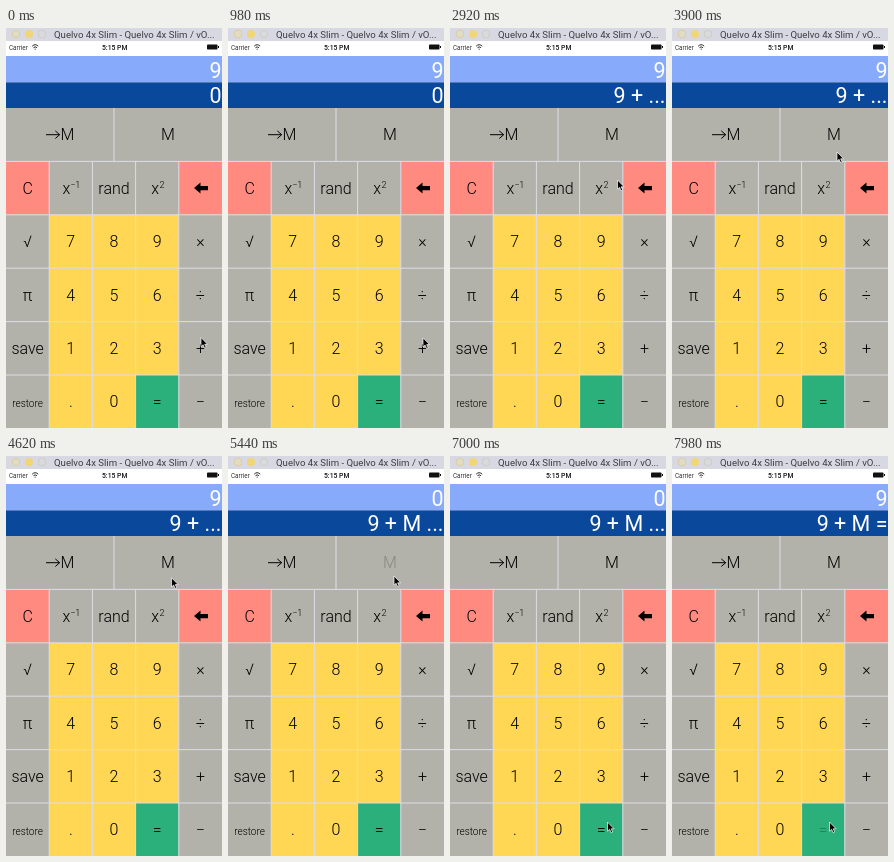
Recreate the animation shown at these times as an HTML page. Size 216 px wide and 400 px high, loop 8000 ms.

```html
<!DOCTYPE html>
<html lang="en">
<head>
<meta charset="utf-8">
<title>Calculator</title>
<style>
  html, body { margin: 0; width: 100%; height: 100%; overflow: hidden; background: #b2b2aa; }
  svg { display: block; width: 100vw; height: 100vh; }
  text { font-family: Roboto, Inter, sans-serif; white-space: pre; }
  .key { font-weight: 300; fill: #000; text-anchor: middle; }
  .lcd { font-size: 21.5px; fill: #fff; text-anchor: end; }
</style>
</head>
<body>
<svg id="stage" viewBox="0 0 216 400"></svg>
<script>
const LOOP = 8000;
const stage = document.getElementById('stage');

function add(tag, attrs, text) {
  const el = document.createElementNS('http://www.w3.org/2000/svg', tag);
  for (const k in attrs) el.setAttribute(k, attrs[k]);
  if (text !== undefined) el.textContent = text;
  stage.appendChild(el);
  return el;
}
const rect = (x, y, width, height, fill) => add('rect', { x, y, width, height, fill });

// Window title bar
rect(0, 0, 216, 13, '#d8d8e2');
add('circle', { cx: 10, cy: 6, r: 3.8, fill: '#e2dcc4', stroke: '#d8c88c', 'stroke-width': .7 });
add('circle', { cx: 23, cy: 6, r: 4, fill: '#f0d674' });
add('circle', { cx: 36, cy: 6, r: 3.8, fill: '#dad9dc', stroke: '#c8c8bc', 'stroke-width': .7 });
add('text', { x: 48, y: 9.6, 'font-size': 9.6, fill: '#3c3c40' },
  'Quelvo 4x Slim - Quelvo 4x Slim / vO...');

// Phone status bar
rect(0, 13, 216, 15, '#fff');
add('text', { x: 3, y: 21.5, 'font-size': 6.3, fill: '#333' }, 'Carrier');
add('path', {
  d: 'M26.2 18.2Q29.2 15.2 32.2 18.2M27.5 19.7Q29.2 18 30.9 19.7M28.7 21.2h1',
  fill: 'none', stroke: '#222', 'stroke-width': 1
});
add('text', { x: 108.7, y: 21.7, 'font-size': 6.8, 'font-weight': 500, fill: '#111', 'text-anchor': 'middle' }, '5:15 PM');
rect(201, 16.5, 10.5, 5, '#111').setAttribute('rx', .8);
rect(212, 18, 1, 2, '#111');

// Displays
rect(0, 28, 216, 26.5, '#87aafb');
rect(0, 54.5, 216, 25.5, '#0a489b');
const value = add('text', { x: 215.5, y: 49.5, class: 'lcd' });
const formula = add('text', { x: 215.5, y: 75, class: 'lcd' });

// Keypad
const GRAY = '#b2b2aa', YELLOW = '#ffd755', RED = '#ff8b80', GREEN = '#2bb07b', LINE = '#dddde6';
const COL = 43.2, ROW = 53.4, TOP = 80;
const rows = [
  ['→M', 'M'],
  ['C', 'x-1', 'rand', 'x2', '⬅'],
  ['√', '7', '8', '9', '×'],
  ['π', '4', '5', '6', '÷'],
  ['save', '1', '2', '3', '+'],
  ['restore', '.', '0', '=', '−']
];
const keys = {};

function keyColor(label) {
  if (label === 'C' || label === '⬅') return RED;
  if (label === '=') return GREEN;
  return /^[\d.]$/.test(label) ? YELLOW : GRAY;
}

function drawLabel(label, cx, cy) {
  const base = cy + 5.7;
  const txt = (s, x, y, size) => add('text', { x, y, class: 'key', 'font-size': size }, s);
  if (label === '→M') {
    add('path', { d: `M40 ${cy}H53.5m-4.2 -3.8L53.7 ${cy}l-4.4 3.8`, fill: 'none', stroke: '#000', 'stroke-width': 1 });
    return txt('M', 61.5, base, 16);
  }
  if (label === '⬅') {
    return add('path', { d: `M188 ${cy}l6.5 -5.5v3.3h7.5v4.4h-7.5v3.3z`, fill: '#000' });
  }
  if (label[0] === 'x') {
    const sup = label.slice(1).replace('-', '−');
    txt('x', sup.length > 1 ? cx - 4.5 : cx - 2, base, 16);
    return txt(sup, sup.length > 1 ? cx + 4.5 : cx + 4.8, base - 6, 9);
  }
  return txt(label, cx, base, label === 'restore' ? 10 : 16);
}

rows.forEach((row, r) => {
  const w = 216 / row.length, y = TOP + r * ROW;
  row.forEach((label, c) => rect(c * w, y, w, ROW, keyColor(label)));
});
rows.forEach((row, r) => {
  const w = 216 / row.length, y = TOP + r * ROW;
  if (r) rect(0, y - .5, 216, 1, LINE);
  row.forEach((label, c) => {
    if (c) rect(c * w - .5, y, 1, ROW, LINE);
    keys[label] = drawLabel(label, (c + .5) * w, y + ROW / 2);
  });
});

const cursor = add('path', {
  d: 'M0 0V9.2L2.1 7.3L3.6 10.7L5.2 10L3.7 6.8H6.6Z',
  fill: '#000', stroke: '#fff', 'stroke-width': .7, 'stroke-linejoin': 'round'
});

// Presses: key, touch down, touch up
const presses = [['+', 1760, 1900], ['M', 5260, 5390], ['=', 7760, 7880]];
const FADE = 420, DIM = .22;

// Readouts from a given time on
const readouts = [[0, '9', '0'], [1900, '9', '9 + ...'], [5390, '0', '9 + M ...'], [7880, '9', '9 + M =']];

// Pointer: time, x, y
const track = [
  [0, 195, 309.5], [900, 195, 309.5], [1400, 195, 314], [2320, 195, 314],
  [2920, 167.5, 152], [3350, 165, 124], [4300, 165, 124], [4900, 166, 120],
  [5850, 166, 120], [6700, 157.5, 366], [LOOP, 157.5, 366]
];

function pointerAt(t) {
  const i = track.findIndex(p => p[0] > t);
  const a = track[i - 1], b = track[i];
  const u = (t - a[0]) / (b[0] - a[0]), e = u * u * (3 - 2 * u);
  return [a[1] + (b[1] - a[1]) * e, a[2] + (b[2] - a[2]) * e];
}

function render(t) {
  const [, top, bottom] = readouts.filter(s => s[0] <= t).pop();
  value.textContent = top;
  formula.textContent = bottom;
  for (const [name, down, up] of presses) {
    const back = Math.min(1, Math.max(0, (t - up) / FADE));
    keys[name].setAttribute('opacity', t < down ? 1 : DIM + (1 - DIM) * back * back);
  }
  cursor.setAttribute('transform', `translate(${pointerAt(t)})`);
}

const start = performance.now();
function tick() {
  render((performance.now() - start) % LOOP);
  requestAnimationFrame(tick);
}
tick();
</script>
</body>
</html>
```
